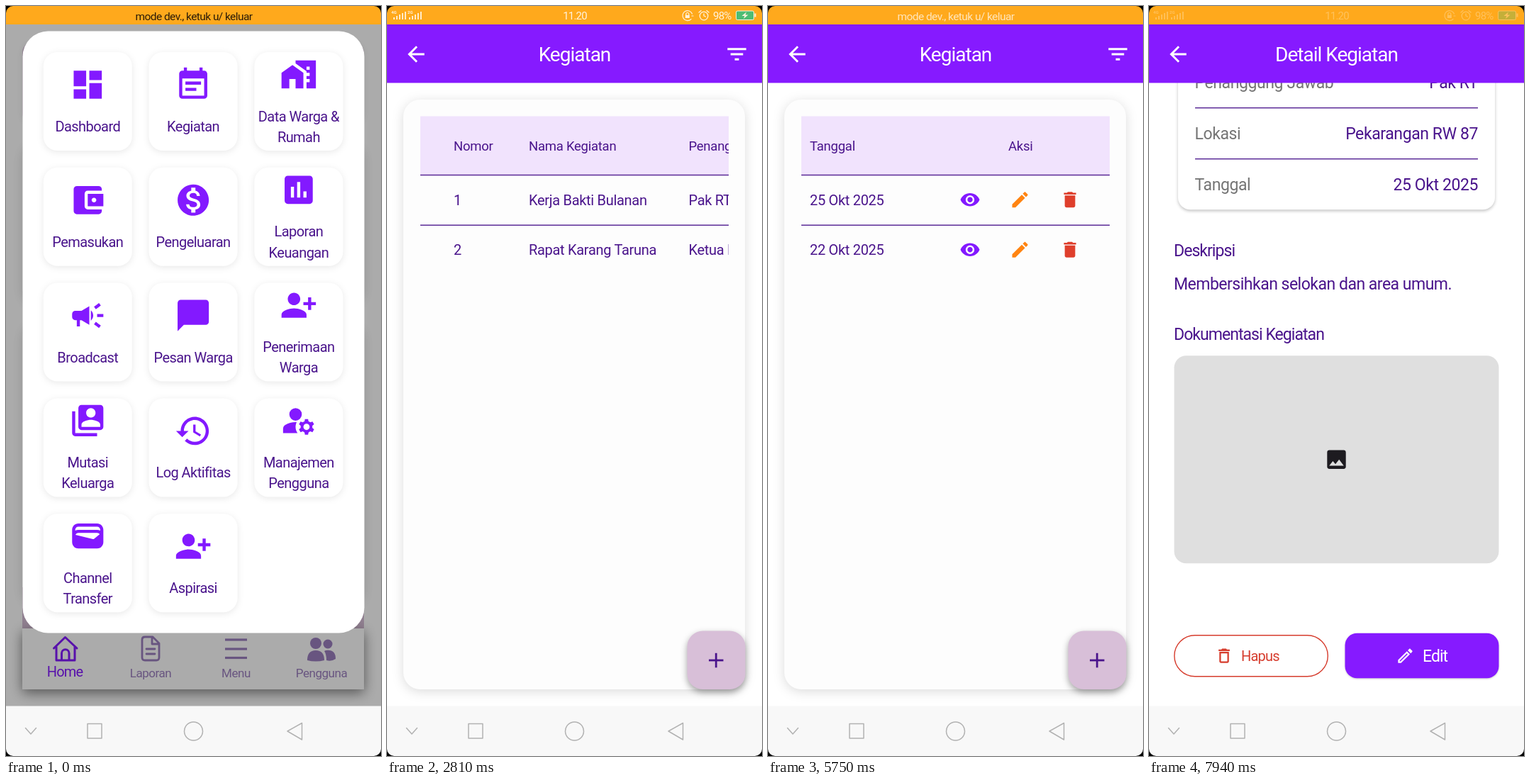
Write an HTML page that moves like this. It is 529 px wide and 1058 px high and loops after 8000 ms.

```html
<!DOCTYPE html>
<html lang="id">
<head>
<meta charset="utf-8">
<title>Kegiatan</title>
<style>
html, body { margin: 0; width: 100%; height: 100%; overflow: hidden; background: #000; }
svg { display: block; width: 100%; height: 100%; font-family: Roboto, "Open Sans", sans-serif; }
.menu { font-size: 20px; letter-spacing: -.55px; }
.title { font-size: 28px; letter-spacing: -1px; }
.nav { font-size: 17px; letter-spacing: -.45px; }
.home { font-size: 20px; letter-spacing: -.8px; }
.head { font-size: 18.5px; letter-spacing: -.25px; }
.cell { font-size: 20px; letter-spacing: -.3px; }
.row { font-size: 23px; letter-spacing: -.4px; }
.note { font-size: 23px; letter-spacing: -.5px; }
.sub { font-size: 23px; letter-spacing: -.95px; }
.dev { font-size: 15.5px; letter-spacing: -.57px; }
.time { font-size: 15px; letter-spacing: -.8px; }
.tiny { font-size: 6px; font-weight: 700; }
.soft { filter: drop-shadow(0 2px 5px rgba(0,0,0,.09)); }
.panel { filter: drop-shadow(0 3px 8px rgba(0,0,0,.14)); }
.lift { filter: drop-shadow(0 4px 5px rgba(0,0,0,.36)); }
.line { fill: none; stroke-linecap: round; stroke-linejoin: round; }
</style>
</head>
<body>
<svg id="stage" viewBox="0 0 529 1058" preserveAspectRatio="none"></svg>
<script>
const LOOP = 8000, STEP = LOOP / 128;
const VIOLET = '#8319ff', INK = '#4a148c', THISTLE = '#d8bfd8', RED = '#d63c2d';

const ICONS = {
  dashboard: 'M3 13h8V3H3v10zm0 8h8v-6H3v6zm10 0h8V11h-8v10zm0-18v6h8V3h-8z',
  event: 'M17 10H7v2h10v-2zm2-7h-1V1h-2v2H8V1H6v2H5c-1.11 0-1.99.9-1.99 2L3 19c0 1.1.89 2 2 2h14c1.1 0 2-.9 2-2V5c0-1.1-.9-2-2-2zm0 16H5V8h14v11zm-5-5H7v2h7v-2z',
  houses: 'M1 11v10h5v-6h4v6h5V11L8 6zM10 3v1.97l7 5V11h2v2h-2v2h2v2h-2v4h6V3H10zm9 6h-2V7h2v2z',
  purse: 'M21 18v1c0 1.1-.9 2-2 2H5c-1.11 0-2-.9-2-2V5c0-1.1.89-2 2-2h14c1.1 0 2 .9 2 2v1h-9c-1.11 0-2 .9-2 2v8c0 1.1.89 2 2 2h9zm-9-2h10V8H12v8zm4-2.5c-.83 0-1.5-.67-1.5-1.5s.67-1.5 1.5-1.5 1.5.67 1.5 1.5-.67 1.5-1.5 1.5z',
  money: 'M12 2C6.48 2 2 6.48 2 12s4.48 10 10 10 10-4.48 10-10S17.52 2 12 2zm1.41 16.09V20h-2.67v-1.93c-1.71-.36-3.16-1.46-3.27-3.4h1.96c.1 1.05.82 1.87 2.65 1.87 1.96 0 2.4-.98 2.4-1.59 0-.83-.44-1.61-2.67-2.14-2.48-.6-4.18-1.62-4.18-3.67 0-1.72 1.39-2.84 3.11-3.21V4h2.67v1.95c1.86.45 2.79 1.86 2.85 3.39H14.3c-.05-1.11-.64-1.87-2.22-1.87-1.5 0-2.4.68-2.4 1.64 0 .84.65 1.39 2.67 1.91s4.18 1.39 4.18 3.91c-.01 1.83-1.38 2.83-3.12 3.16z',
  chart: 'M19 3H5c-1.1 0-2 .9-2 2v14c0 1.1.9 2 2 2h14c1.1 0 2-.9 2-2V5c0-1.1-.9-2-2-2zM9 17H7v-7h2v7zm4 0h-2V7h2v10zm4 0h-2v-4h2v4z',
  horn: 'M18 11v2h4v-2h-4zm-2 6.61c.96.71 2.21 1.65 3.2 2.39.4-.53.8-1.07 1.2-1.6-.99-.74-2.24-1.68-3.2-2.4-.4.54-.8 1.08-1.2 1.61zM20.4 5.6c-.4-.53-.8-1.07-1.2-1.6-.99.74-2.24 1.68-3.2 2.4.4.53.8 1.07 1.2 1.6.96-.72 2.21-1.65 3.2-2.4zM4 9c-1.1 0-2 .9-2 2v2c0 1.1.9 2 2 2h1v4h2v-4h1l5 3V6L8 9H4zm11.5 3c0-1.33-.58-2.53-1.5-3.35v6.69c.92-.81 1.5-2.01 1.5-3.34z',
  chat: 'M20 2H4c-1.1 0-2 .9-2 2v18l4-4h14c1.1 0 2-.9 2-2V4c0-1.1-.9-2-2-2z',
  personAdd: 'M13 8c0-2.21-1.79-4-4-4S5 5.79 5 8s1.79 4 4 4 4-1.79 4-4zm2 2v2h3v3h2v-3h3v-2h-3V7h-2v3h-3zM1 18v2h16v-2c0-2.66-5.33-4-8-4s-8 1.34-8 4z',
  switchUser: 'M4 6H2v14c0 1.1.9 2 2 2h14v-2H4V6zm16-4H8c-1.1 0-2 .9-2 2v12c0 1.1.9 2 2 2h12c1.1 0 2-.9 2-2V4c0-1.1-.9-2-2-2zm-6 2c1.66 0 3 1.34 3 3s-1.34 3-3 3-3-1.34-3-3 1.34-3 3-3zm6 12H8v-1.5c0-1.99 4-3 6-3s6 1.01 6 3V16z',
  history: 'M13 3c-4.97 0-9 4.03-9 9H1l3.89 3.89.07.14L9 12H6c0-3.87 3.13-7 7-7s7 3.13 7 7-3.13 7-7 7c-1.93 0-3.68-.79-4.94-2.06l-1.42 1.42C8.27 19.99 10.51 21 13 21c4.97 0 9-4.03 9-9s-4.03-9-9-9zm-1 5v5l4.28 2.54.72-1.21-3.5-2.08V8H12z',
  manage: 'M6 8a4 4 0 1 0 8 0a4 4 0 1 0-8 0zM10.67 13.02C10.45 13.01 10.23 13 10 13c-2.42 0-4.68.67-6.61 1.82C2.51 15.34 2 16.32 2 17.35V20h9.26C10.47 18.87 10 17.49 10 16c0-1.07.25-2.07.67-2.98zM20.75 16c0-.22-.03-.42-.06-.63l1.14-1.01-1-1.73-1.45.49c-.32-.27-.68-.48-1.08-.63L18 11h-2l-.3 1.49c-.4.15-.76.36-1.08.63l-1.45-.49-1 1.73 1.14 1.01c-.03.21-.06.41-.06.63s.03.42.06.63l-1.14 1.01 1 1.73 1.45-.49c.32.27.68.48 1.08.63L16 21h2l.3-1.49c.4-.15.76-.36 1.08-.63l1.45.49 1-1.73-1.14-1.01c.03-.21.06-.41.06-.63zM17 18c-1.1 0-2-.9-2-2s.9-2 2-2 2 .9 2 2-.9 2-2 2z',
  wallet: 'M18 4H6C3.79 4 2 5.79 2 8v8c0 2.21 1.79 4 4 4h12c2.21 0 4-1.79 4-4V8c0-2.21-1.79-4-4-4zm-1.86 9.77c-.24.2-.57.28-.88.2L4.15 11.25C4.45 10.52 5.16 10 6 10h12c.67 0 1.26.34 1.63.84l-3.49 2.93zM6 6h12c1.1 0 2 .9 2 2v.55c-.59-.34-1.27-.55-2-.55H6c-.73 0-1.41.21-2 .55V8c0-1.1.9-2 2-2z',
  back: 'M20 11H7.83l5.59-5.59L12 4l-8 8 8 8 1.41-1.41L7.83 13H20v-2z',
  filter: 'M10 18h4v-2h-4v2zM3 6v2h18V6H3zm3 7h12v-2H6v2z',
  eye: 'M12 4.5C7 4.5 2.73 7.61 1 12c1.73 4.39 6 7.5 11 7.5s9.27-3.11 11-7.5c-1.73-4.39-6-7.5-11-7.5zM12 17c-2.76 0-5-2.24-5-5s2.24-5 5-5 5 2.24 5 5-2.24 5-5 5zm0-8c-1.66 0-3 1.34-3 3s1.34 3 3 3 3-1.34 3-3-1.34-3-3-3z',
  pencil: 'M3 17.25V21h3.75L17.81 9.94l-3.75-3.75L3 17.25zM20.71 7.04c.39-.39.39-1.02 0-1.41l-2.34-2.34c-.39-.39-1.02-.39-1.41 0l-1.83 1.83 3.75 3.75 1.83-1.83z',
  trash: 'M6 19c0 1.1.9 2 2 2h8c1.1 0 2-.9 2-2V7H6v12zM19 4h-3.5l-1-1h-5l-1 1H5v2h14V4z',
  trashLine: 'M6 19c0 1.1.9 2 2 2h8c1.1 0 2-.9 2-2V7H6v12zM8 9h8v10H8V9zm7.5-5l-1-1h-5l-1 1H5v2h14V4h-3.5z',
  pencilLine: 'M14.06 9.02l.92.92L5.92 19H5v-.92l9.06-9.06M17.66 3c-.25 0-.51.1-.7.29l-1.83 1.83 3.75 3.75 1.83-1.83c.39-.39.39-1.02 0-1.41l-2.34-2.34c-.2-.2-.45-.29-.71-.29zm-3.6 3.19L3 17.25V21h3.75L17.81 9.94l-3.75-3.75z',
  image: 'M21 19V5c0-1.1-.9-2-2-2H5c-1.1 0-2 .9-2 2v14c0 1.1.9 2 2 2h14c1.1 0 2-.9 2-2zM8.5 13.5l2.5 3.01L14.5 12l4.5 6H5l3.5-4.5z'
};

const icon = (name, x, y, size, fill = VIOLET) =>
  `<path d="${ICONS[name]}" fill="${fill}" fill-rule="evenodd" transform="translate(${x} ${y}) scale(${size / 24}) translate(-12 -12)"/>`;
const text = (s, x, y, cls, fill = INK, anchor = 'start') =>
  `<text x="${x}" y="${y}" class="${cls}" fill="${fill}" text-anchor="${anchor}">${s.replace('&', '&amp;')}</text>`;
const rect = (x, y, w, h, r, fill, extra = '') =>
  `<rect x="${x}" y="${y}" width="${w}" height="${h}" rx="${r}" fill="${fill}" ${extra}/>`;
const line = (d, color, width) =>
  `<path class="line" d="${d}" stroke="${color}" stroke-width="${width}"/>`;
const rule = (x1, x2, y) => rect(x1, y - .75, x2 - x1, 1.5, 0, INK, 'opacity=".9"');

const MENU = [
  ['dashboard', 'Dashboard'], ['event', 'Kegiatan'], ['houses', 'Data Warga &', 'Rumah'],
  ['purse', 'Pemasukan'], ['money', 'Pengeluaran'], ['chart', 'Laporan', 'Keuangan'],
  ['horn', 'Broadcast'], ['chat', 'Pesan Warga'], ['personAdd', 'Penerimaan', 'Warga'],
  ['switchUser', 'Mutasi', 'Keluarga'], ['history', 'Log Aktifitas'], ['manage', 'Manajemen', 'Pengguna'],
  ['wallet', 'Channel', 'Transfer'], ['personAdd', 'Aspirasi']
];

function menuCard([name, ...lines], i) {
  const x = 115.3 + (i % 3) * 148.8, y = 65 + Math.floor(i / 3) * 162.8;
  const lift = lines.length > 1 ? 14.5 : 0;
  return rect(x - 62.5, y, 125, 139, 20, '#fff', 'class="soft"') + icon(name, x, y + 46 - lift, 52.9) +
    lines.map((s, n) => text(s, x, y + 112 - lift + n * 29.2, 'menu', INK, 'middle')).join('');
}

function homePage() {
  const faded = '#9b7ebf';
  const heads = [[437, 899, 8], [454, 900, 6.5]].map(([x, y, r]) => `<circle cx="${x}" cy="${y}" r="${r}" fill="${faded}"/>`).join('');
  return rect(0, 26, 529, 962, 0, '#fff') +
    rect(23, 50, 482, 116.5, 16, THISTLE, 'class="soft"') +
    `<circle cx="67.5" cy="108.5" r="32" fill="${VIOLET}"/>` +
    text('P', 67.5, 116, 'row', '#fff', 'middle') +
    text('Hai, Pramo', 117, 104.5, 'title') + text('Welcome Back!', 117, 134.5, 'menu') +
    line('M445 118C449 114 448 109 448 105A10.5 10.5 0 0 1 469 105C469 109 468 114 472 118ZM458.5 94V92M455 124Q458.5 126.5 462 124', VIOLET, 2.4) +
    rect(23, 191, 482, 230, 24, '#fff', 'class="panel"') +
    text('Dashboard Statistik', 46, 243, 'title') +
    rect(23, 445, 482, 400, 24, '#fff', 'class="panel"') +
    rect(23, 820, 482, 60, 0, THISTLE) +
    `<g style="filter:drop-shadow(0 5px 9px rgba(0,0,0,.5))">${rect(23, 878, 482, 86, 0, '#fff')}</g>` +
    line('M67.5 906L83.5 890.5L100 906M71 904V923H97V904M78.5 923V913A5 5 0 0 1 89 913V923', VIOLET, 3) +
    line('M196 890H207L216 899V919Q216 923 212 923H196Q192 923 192 919V894Q192 890 196 890ZM206 890V900H216M198 907H210M198 914H210', faded, 2.8) +
    [894, 907, 919.5].map(y => rect(309, y - 1.6, 31, 3.2, 0, faded)).join('') +
    heads + `<path d="M425 923Q425 909 437 909T449 923Q437 926 425 923ZM451 909Q465 907 465 921Q459 925 452 923Q452 914 449 910Z" fill="${faded}"/>` +
    text('Home', 83, 946, 'home', VIOLET, 'middle') +
    ['Laporan', 'Menu', 'Pengguna'].map((s, i) => text(s, 204 + i * 120.5, 947, 'nav', faded, 'middle')).join('');
}

const appBar = title => rect(0, 26, 529, 82.5, 0, '#861aff') + icon('back', 41, 68, 35.2, '#fff') +
  text(title, 264.5, 78, 'title', '#fff', 'middle');

function tablePage() {
  const columns = [[94, 'Nomor'], [200, 'Nama Kegiatan'], [425.5, 'Penanggung Jawab'], [652, 'Tanggal'], [932, 'Aksi']];
  const rows = [
    ['1', 'Kerja Bakti Bulanan', 'Pak RT', '25 Okt 2025'],
    ['2', 'Rapat Karang Taruna', 'Ketua Karuna', '22 Okt 2025']
  ];
  const body = rows.map((cells, r) => {
    const y = 273.3 + r * 70.5;
    return cells.map((s, i) => text(s, columns[i][0], y + 7.4, 'cell')).join('') +
      icon('eye', 878, y, 29.4) + icon('pencil', 948.5, y, 29.4, '#ff8412') + icon('trash', 1019, y, 29.4, '#df3f2c');
  }).join('');
  return rect(0, 26, 529, 962, 0, '#fff') + appBar('Kegiatan') + icon('filter', 493.5, 68, 35.2, '#fff') +
    rect(23, 132, 482, 832, 24, '#fdfdfd', 'class="panel"') +
    rect(47, 155.5, 435, 83, 0, '#f1e3fd') +
    `<g clip-path="url(#tableClip)"><g id="columns">${columns.map(([x, s]) => text(s, x, 204, 'head')).join('')}${body}</g></g>` +
    rule(47, 482, 238.5) + rule(47, 482, 309.2) +
    rect(47, 934.5, 184.5, 6, 0, '#bcbcbc', 'id="thumb"') +
    rect(423.5, 881.5, 82, 82.5, 22, THISTLE, 'class="lift"') +
    rect(454, 921.6, 20.5, 2.8, 0, INK) + rect(462.8, 912.8, 2.8, 20.5, 0, INK);
}

function detailPage() {
  const rows = [
    ['Nama Kegiatan', 'Kerja Bakti Bulanan'], ['Kategori', 'Kebersihan & Keamanan'],
    ['Penanggung Jawab', 'Pak RT'], ['Lokasi', 'Pekarangan RW 87'], ['Tanggal', '25 Okt 2025']
  ];
  const list = rows.map(([label, value], i) => {
    const y = 190 + i * 72;
    return text(label, 64.5, y, 'row', '#757575') + text(value, 464, y, 'row', INK, 'end') +
      (i < 4 ? rule(65, 464, y + 28) : '');
  }).join('');
  return rect(0, 26, 529, 962, 0, '#fff') +
    `<g clip-path="url(#pageClip)"><g id="detailBody">` +
    rect(41, 148, 447, 357.5, 17, '#fff', 'style="filter:drop-shadow(0 2px 2px rgba(0,0,0,.24))"') + list +
    text('Deskripsi', 35, 571.5, 'sub') + text('Membersihkan selokan dan area umum.', 35, 618.5, 'note') +
    text('Dokumentasi Kegiatan', 35, 689, 'sub') +
    rect(35.5, 711.5, 458, 293, 17, '#dfdfdf') + icon('image', 264.5, 858, 35.2, '#1d1b20') +
    rect(35.8, 1106, 216.5, 58, 29, '#fff', `stroke="${RED}" stroke-width="1.4"`) +
    icon('trashLine', 106, 1135, 27, RED) + text('Hapus', 130, 1142, 'home', RED) +
    rect(276.5, 1103, 217, 63.5, 17, '#861aff', 'style="filter:drop-shadow(0 1px 1px rgba(0,0,0,.2))"') +
    icon('pencilLine', 361.5, 1135, 27, '#fff') + text('Edit', 386, 1143, 'sub', '#fff') +
    `</g></g>` + appBar('Detail Kegiatan');
}

function statusBar() {
  const signal = x => [3, 5, 7, 9, 11].map((h, i) => rect(x + 2 + i * 4, 19 - h, 1.8, h, 0, 'currentColor')).join('');
  return rect(0, 0, 529, 26, 0, '#ffa91c') +
    `<g id="devMode">${text('mode dev., ketuk u/ keluar', 265, 19.5, 'dev', 'currentColor', 'middle')}</g><g id="clock">` +
    signal(7) + signal(29) + text('4G', 6, 11, 'tiny', 'currentColor') + text('2G', 29, 11, 'tiny', 'currentColor') +
    text('11.20', 265, 19, 'time', 'currentColor', 'middle') +
    line('M429 18.5A7 7 0 1 1 430.5 11M432 14H430M421.8 13V11.5A2 2 0 0 1 425.8 11.5V13', 'currentColor', 1.2) +
    rect(420.8, 12.8, 6, 4.2, 0, 'currentColor') +
    '<circle cx="447" cy="14" r="5.8" fill="none" stroke="currentColor" stroke-width="1.3"/>' +
    line('M447 11V14L449.5 15M440 9L443 6.5M454 9L451 6.5', 'currentColor', 1.3) +
    text('98%', 460, 18.5, 'time', 'currentColor') +
    rect(492.5, 7, 25, 12.5, 2, '#2fc184', 'stroke="currentColor" stroke-width="1"') +
    rect(518.5, 10.5, 2, 5, 0, 'currentColor') +
    '<path d="M507 8.5L500.5 14H504.5L503 18L509.5 12.5H505.5Z" fill="currentColor"/></g>';
}

const systemNav = () => rect(0, 987.5, 529, 71, 0, '#f8f8f8') +
  line('M27.5 1018.5L35 1027L42.5 1018.5M115 1012.5H135V1033H115ZM251.5 1023A13 13 0 1 1 277.5 1023A13 13 0 1 1 251.5 1023M417.5 1011.5L397 1023L417.5 1035Z', '#b2b2b2', 1.5);

const clip = (id, body) => `<clipPath id="${id}">${body}</clipPath>`;
const stage = document.getElementById('stage');
stage.innerHTML =
  `<defs>${clip('screenClip', rect(0, 0, 529, 1058, 10, '#000'))}${clip('tableClip', rect(47, 150, 435, 780, 0, '#000'))}${clip('pageClip', rect(0, 108, 529, 880, 0, '#000'))}</defs>` +
  `<g clip-path="url(#screenClip)"><g id="home">${homePage()}${rect(0, 26, 529, 962, 0, '#000', 'id="scrim"')}` +
  `<g id="sheet">${rect(23.5, 35.5, 482, 849, 36, '#fff')}${MENU.map(menuCard).join('')}</g></g>` +
  `<g id="table">${tablePage()}</g><g id="detail">${detailPage()}</g>` +
  `<g id="status">${statusBar()}</g>${systemNav()}</g>`;

const el = {};
stage.querySelectorAll('g[id], rect[id]').forEach(n => el[n.id] = n);

const linear = u => u;
const easeOut = u => 1 - (1 - u) ** 2.2;

// Interpolates [time, value] stops.
function track(t, stops, ease = linear) {
  if (t <= stops[0][0]) return stops[0][1];
  for (let i = 1; i < stops.length; i++) {
    const [t0, a] = stops[i - 1], [t1, b] = stops[i];
    if (t < t1) return a + (b - a) * ease((t - t0) / (t1 - t0));
  }
  return stops[stops.length - 1][1];
}

const move = (node, x, y) => node.setAttribute('transform', `translate(${x} ${y})`);
function fade(node, value) {
  node.setAttribute('opacity', value);
  node.style.display = value > 0 ? '' : 'none';
}

function draw(t) {
  move(el.sheet, 0, track(t, [[2062, 0], [2125, 212.5], [2290, 953]]));
  fade(el.scrim, track(t, [[2062, .33], [2125, .2], [2270, 0]]));
  fade(el.table, track(t, [[2200, 0], [2440, 1]]));
  fade(el.detail, track(t, [[6000, 0], [6240, 1]]));

  const shift = t < 3687 ? track(t, [[3430, 0], [3687, 304]]) : track(t, [[3687, 304], [4080, 593]], easeOut);
  move(el.columns, -shift, 0);
  move(el.thumb, shift / 593 * 250.5, 0);
  fade(el.thumb, track(t, [[3400, 0], [3480, 1], [4680, 1], [4980, 0]]));
  move(el.detailBody, 0, -track(t, [[7300, 0], [7860, 218.3]], easeOut));

  el.status.setAttribute('color', t < 2250 ? '#2b1c08' : '#fff');
  fade(el.devMode, track(t, [[1250, 1], [1500, 0], [4700, 0], [5100, .7], [6900, .7], [7190, .4], [7580, 0]]));
  fade(el.clock, track(t, [[1500, 0], [1800, 1], [2200, 1], [2300, .85], [4300, .85], [4700, 0], [7580, 0], [7940, .28]]));
}

const start = performance.now();
function tick() {
  const t = (performance.now() - start) % LOOP;
  draw(Math.floor(t / STEP + .05) * STEP);
  requestAnimationFrame(tick);
}
tick();
</script>
</body>
</html>
```
